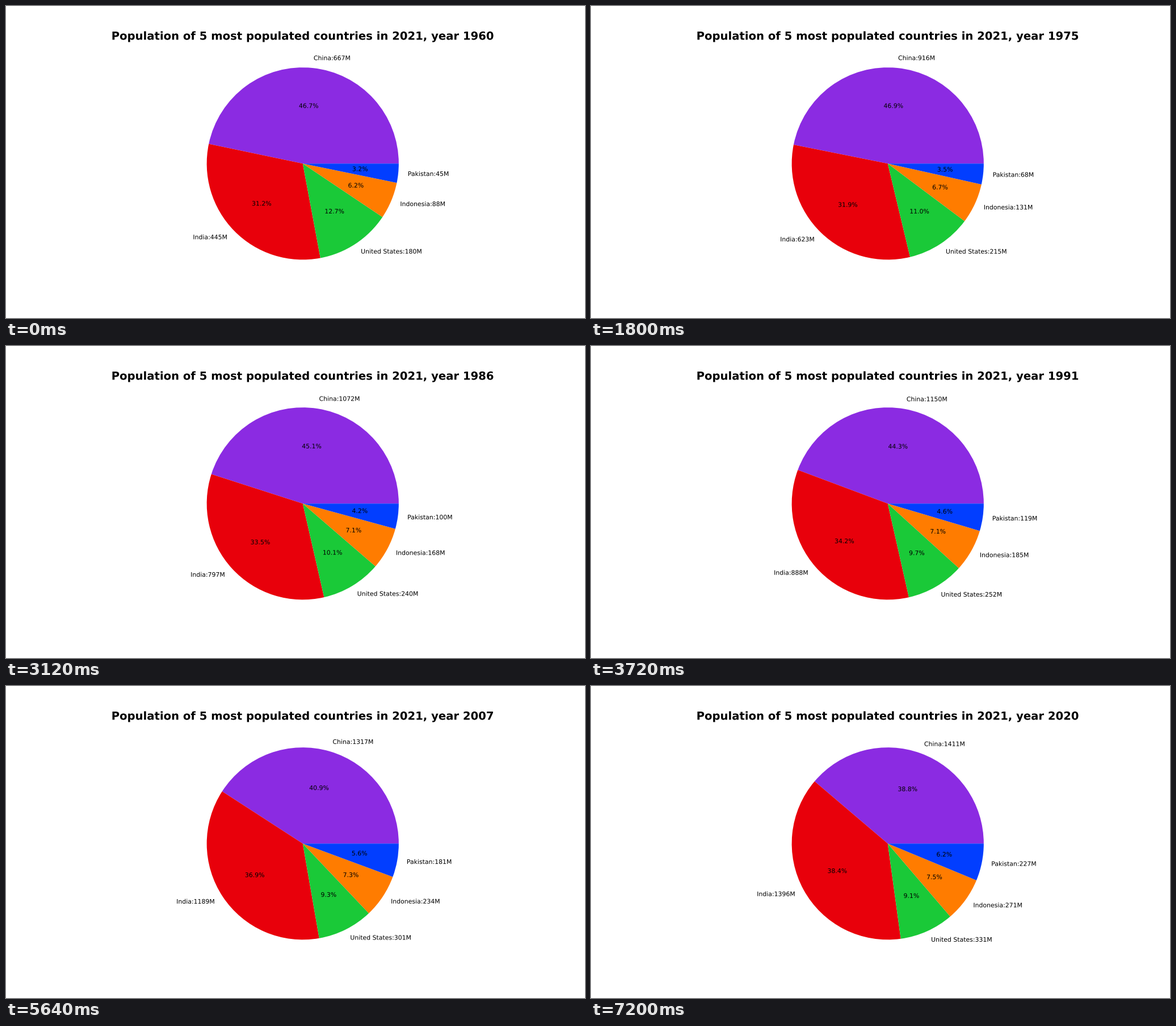
A matplotlib script for the animation above (7320 ms loop, 1020 by 549 pixels).

```python
import matplotlib.pyplot as plt
import numpy as np
from matplotlib.animation import FuncAnimation
from matplotlib.patheffects import Normal

DPI = 64
POINT = 1020 / 13 / DPI  # type scale of a 13 inch wide figure
FRAME_MS = 120
YEARS = np.arange(1960, 2021)

COLORS = ["#8B2BE2", "#E8000B", "#1AC938", "#FF7C00", "#023EFF"]

# Millions of people at a few key years; the curve between them is eased.
KEY_YEARS = np.array([1960, 1962, 1967, 1975, 1981, 1991, 1999, 2007, 2020])
POPULATION = {
    "China": [667.1, 665.8, 754.5, 916.4, 993.9, 1150.8, 1252.7, 1317.9, 1411.1],
    "India": [445.9, 467, 522, 623.5, 712.9, 888.9, 1040.5, 1189.7, 1396.4],
    "United States": [180.7, 186.5, 198.7, 215.9, 229.5, 252.9, 279.1, 301.2, 331.5],
    "Indonesia": [88.3, 93.4, 106.7, 131.8, 151.6, 185.4, 210.9, 234.8, 271.8],
    "Pakistan": [45.9, 48.2, 54.8, 68.1, 84.3, 119.2, 149.6, 181.8, 227.2],
}


def smooth(x, xs, ys):
    """Cubic Hermite curve through the key points."""
    ys = np.asarray(ys, dtype=float)
    slopes = np.gradient(ys, xs)
    i = np.clip(np.searchsorted(xs, x, side="right") - 1, 0, len(xs) - 2)
    step = xs[i + 1] - xs[i]
    t = (x - xs[i]) / step
    ease = t ** 2 * (3 - 2 * t)
    bend = t * (1 - t) * ((1 - t) * slopes[i] - t * slopes[i + 1])
    return ys[i] + ease * (ys[i + 1] - ys[i]) + step * bend


# Text drawn as outlines keeps its exact width and position.
plt.rcParams.update({"font.family": "DejaVu Sans", "text.hinting": "no_hinting"})
OUTLINE = [Normal()]

fig, ax = plt.subplots(figsize=(1020 / DPI, 549 / DPI), dpi=DPI)
series = {name: smooth(YEARS, KEY_YEARS, values)
          for name, values in POPULATION.items()}


def draw(frame):
    ax.clear()
    sizes = [values[frame] for values in series.values()]
    labels = [f"{name}:{int(size)}M" for name, size in zip(series, sizes)]
    ax.pie(sizes, labels=labels, colors=COLORS, autopct="%1.1f%%",
           textprops={"fontsize": 10 * POINT, "path_effects": OUTLINE})
    ax.set_title("Population of 5 most populated countries in 2021, "
                 f"year {YEARS[frame]}", fontsize=18 * POINT,
                 fontweight="bold", pad=6 * POINT, path_effects=OUTLINE)
    return []


animation = FuncAnimation(fig, draw, frames=len(YEARS), interval=FRAME_MS,
                          init_func=lambda: [], repeat=True, repeat_delay=0)
plt.show()
```
